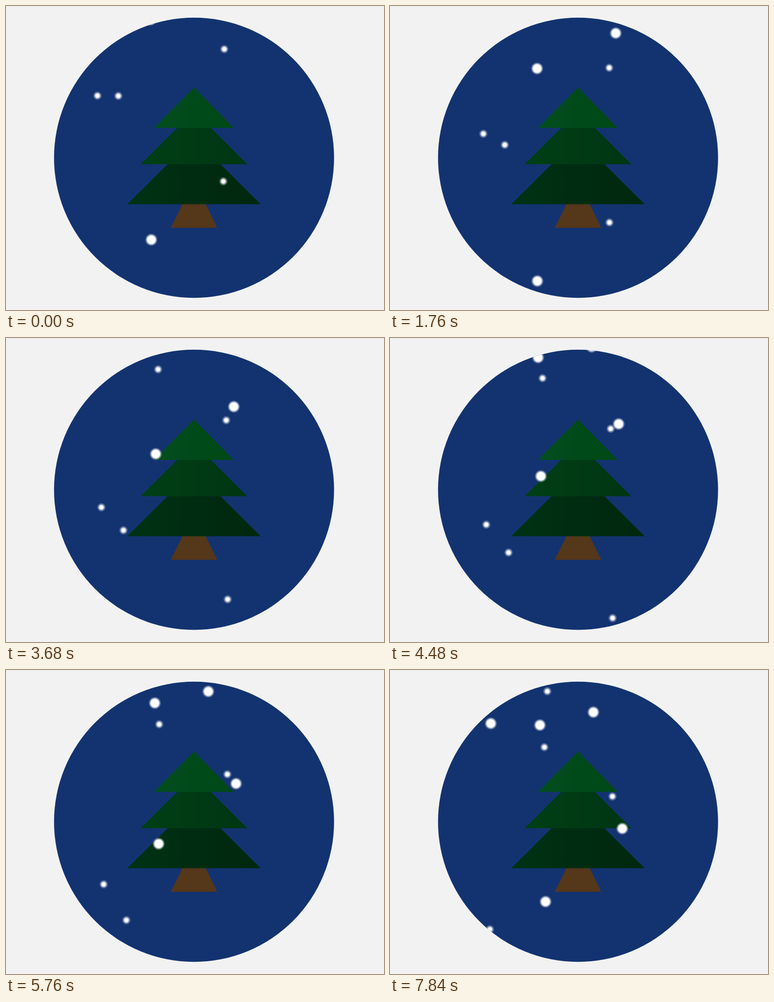
Write an HTML page that moves like this. It is 835 px wide and 671 px high and loops after 8 s.

```html
<!DOCTYPE html>
<html lang="en">
<head>
<meta charset="utf-8">
<title>Snowy tree</title>
<style>
  html, body { margin: 0; width: 100%; height: 100%; overflow: hidden; background: #f2f2f2; }
  svg { display: block; width: 835px; height: 671px; }
</style>
</head>
<body>
<svg viewBox="0 0 835 671">
  <defs>
    <clipPath id="globe"><circle cx="415.4" cy="335" r="309.3"/></clipPath>
    <linearGradient id="top"><stop offset=".1" stop-color="#044d1e"/><stop offset=".5" stop-color="#004a1a"/><stop offset="1" stop-color="#004818"/></linearGradient>
    <linearGradient id="middle"><stop offset="0" stop-color="#003f16"/><stop offset="1" stop-color="#003612"/></linearGradient>
    <linearGradient id="bottom"><stop offset="0" stop-color="#003213"/><stop offset="1" stop-color="#00270f"/></linearGradient>
    <radialGradient id="small"><stop offset=".36" stop-color="#fff"/><stop offset=".65" stop-color="#fff" stop-opacity=".45"/><stop offset="1" stop-color="#fff" stop-opacity="0"/></radialGradient>
    <radialGradient id="large"><stop offset=".6" stop-color="#fff"/><stop offset=".8" stop-color="#fff" stop-opacity=".45"/><stop offset="1" stop-color="#fff" stop-opacity="0"/></radialGradient>
  </defs>
  <rect width="835" height="671" fill="#f2f2f2"/>
  <rect width="835" height="1.5" fill="#ebebeb"/>
  <circle cx="415.4" cy="335" r="309.3" fill="#133370"/>
  <path d="M390 437H441L466.5 489.5H364Z" fill="#553719"/>
  <path d="M415.5 291L562.5 437.5H268Z" fill="url(#bottom)"/>
  <path d="M415.5 232L533 349.3H297.5Z" fill="url(#middle)"/>
  <path d="M415.5 180L503 269H327Z" fill="url(#top)"/>
  <g id="snow" clip-path="url(#globe)"></g>
</svg>
<script>
const LOOP = 8000, STEP = 160, DRIFT = 0.05;
const RADIUS = { small: 10, large: 14 };

// size, x, y, time in seconds at that point, fall speed in px/s
const flakes = [
  ['small', 482.2, 95.2, 0, 23.45],
  ['small', 202, 198, 0, 47.75],
  ['small', 248.2, 198.5, 0, 61.4],
  ['small', 480.2, 387, 0, 51.6],
  ['large', 321, 516, 0, 51.7],
  ['large', 325, 138, 1.76, 61.4],
  ['large', 498.7, 60, 1.76, 47.7],
  ['small', 336, 69.3, 3.68, 24.3],
  ['large', 328, 58, 5.12, 23.4],
  ['large', 446.3, 33.3, 5.12, 22],
  ['large', 222.7, 118, 7.84, 35],
  ['small', 347.5, 47, 7.84, 47.7]
].map(([size, x, y, at, speed]) => {
  const node = document.createElementNS('http://www.w3.org/2000/svg', 'circle');
  node.setAttribute('r', RADIUS[size]);
  node.setAttribute('fill', `url(#${size})`);
  document.getElementById('snow').append(node);
  return { node, x, y, at, speed };
});

const start = performance.now();

function draw(now) {
  const elapsed = Math.max(0, now - start) % LOOP;
  const time = Math.floor(elapsed / STEP) * STEP / 1000;
  for (const { node, x, y, at, speed } of flakes) {
    const fall = (time - at) * speed;
    node.setAttribute('cx', x + fall * DRIFT);
    node.setAttribute('cy', y + fall);
  }
  requestAnimationFrame(draw);
}
draw(start);
</script>
</body>
</html>
```
